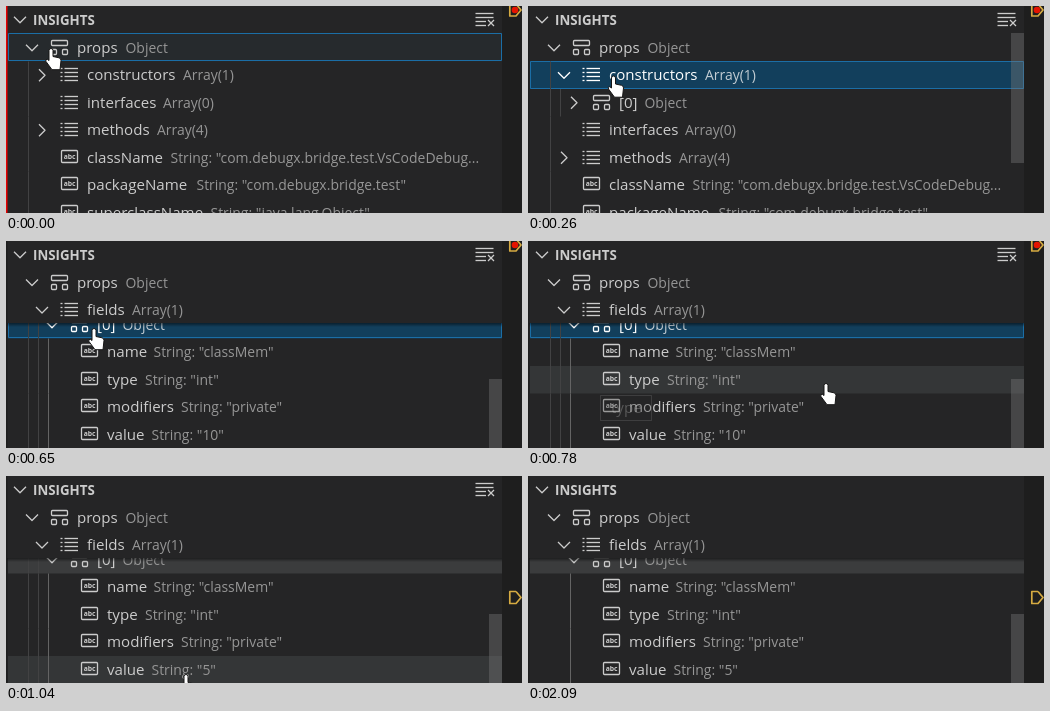
Animation of 516x207 px, one loop 2.22 s. Source, as an HTML page with a canvas:

```html
<!DOCTYPE html>
<html lang="en">
<head>
<meta charset="utf-8">
<title>Insights panel</title>
<style>
  html, body { margin: 0; width: 516px; height: 207px; overflow: hidden; background: #252526; }
  canvas { display: block; }
</style>
</head>
<body>
<canvas id="stage" width="516" height="207"></canvas>
<script>
const ctx = document.getElementById('stage').getContext('2d');
const LOOP = 2220, ROW = 27.5, TOP = 28, PANEL = 496;
const FG = '#cccccc', DIM = '#969696', BRIGHT = '#ffffff', BRIGHT_DIM = '#c3cdd4';

const node = (level, icon, label, type, typeX, open) => ({ level, icon, label, type, typeX, open });
const opened = n => ({ ...n, open: true });

const props = node(0, 'object', 'props', 'Object', 119.5, true);
const constructors = node(1, 'array', 'constructors', 'Array(1)', 177, false);
const interfaces = node(1, 'array', 'interfaces', 'Array(0)', 157);
const methods = node(1, 'array', 'methods', 'Array(4)', 151, false);
const className = node(1, 'string', 'className', 'String: "com.debugx.bridge.test.VsCodeDebug...', 164.5);
const packageName = node(1, 'string', 'packageName', 'String: "com.debugx.bridge.test"', 190.5);
const superName = node(1, 'string', 'superclassName', 'String: "java.lang.Object"', 204.5);
const fields = node(1, 'array', 'fields', 'Array(1)', 126, true);
const item = node(2, 'object', '[0]', 'Object', 116.5, false);
const itemName = node(3, 'string', 'name', 'String: "com.debugx.bridge.test.VsCodeDebugXBr...', 147.5);
const modifiers = type => node(3, 'string', 'modifiers', `String: "${type}"`, 175);
const parameters = node(3, 'array', 'parameters', 'Array(1)', 189, false);

const member = value => [
  opened(item),
  node(3, 'string', 'name', 'String: "classMem"', 147.5),
  node(3, 'string', 'type', 'String: "int"', 139),
  modifiers('private'),
  node(3, 'string', 'value', `String: "${value}"`, 145.5)
];
const leaves = [interfaces, methods, className, packageName, superName];
const scrolled = (value, more) => ({
  sticky: [props, fields], rows: member(value), top: 70,
  selected: 0, style: 'active', bar: [138, 69], guides: 1, actions: true, ...more
});
const tree = (rows, more) => ({
  sticky: [], rows, top: TOP, style: 'active', guides: 1, actions: true, paused: true, ...more
});

const scenes = [
  tree([props, constructors, ...leaves],
    { at: 0, selected: 0, style: 'outline', cursor: [45, 43], edge: true }),
  tree([props, constructors, ...leaves],
    { at: 130, selected: 0, style: 'outline', hover: 1, cursor: [78, 67] }),
  tree([props, opened(constructors), item, ...leaves],
    { at: 260, selected: 1, bar: [27, 130], cursor: [85.5, 70.5] }),
  tree([props, opened(constructors), opened(item), itemName, modifiers(''), parameters, interfaces],
    { at: 390, selected: 2, bar: [27, 98], cursor: [74.5, 107] }),
  tree([...leaves, fields],
    { at: 520, sticky: [props], top: 55, selected: 5, bar: [95, 98], cursor: [88, 187] }),
  scrolled('10', { at: 650, paused: true, cursor: [88, 88] }),
  scrolled('10', { at: 780, paused: true, hover: 2, cursor: [298, 143], tooltip: true }),
  scrolled('10', { at: 910, paused: true, hover: 4, cursor: [205, 186] }),
  scrolled('5', { at: 1040, style: 'inactive', hover: 4, cursor: [180, 199] }),
  scrolled('5', { at: 1960, style: 'inactive', guides: 0.3, actions: false }),
  scrolled('5', { at: 2090, style: 'inactive', guides: 0, actions: false })
];

const hand = new Path2D('M-2 1.5a2 2 0 0 1 4 0v6l6 1.3q2 .6 2 2.6l-1 9.3h-8l-6-8.2q-1-2 1.2-2.3l1.8 1.3z');

function fill(color, x, y, w, h) {
  ctx.fillStyle = color;
  ctx.fillRect(x, y, w, h);
}

function line(points, color = FG, width = 1.3) {
  ctx.strokeStyle = color;
  ctx.lineWidth = width;
  ctx.beginPath();
  points.forEach(([x, y]) => ctx.lineTo(x, y));
  ctx.stroke();
}

function text(str, x, y, size, color, weight = 400) {
  ctx.font = `${weight} ${size}px "Open Sans", sans-serif`;
  ctx.fillStyle = color;
  ctx.fillText(str, x, Math.round(y));
}

function chevron(x, y, open, color) {
  line(open ? [[x - 6, y - 3], [x, y + 3], [x + 6, y - 3]]
            : [[x - 3, y - 6], [x + 3, y], [x - 3, y + 6]], color);
}

function box(x, y, w, h, color) {
  ctx.strokeStyle = color;
  ctx.lineWidth = 1.3;
  ctx.beginPath();
  ctx.roundRect(x, y, w, h, 1);
  ctx.stroke();
}

const icons = {
  object(x, y, color) {
    box(x - 8, y - 8, 16, 5, color);
    box(x - 8, y + 1, 5, 5, color);
    box(x + 3, y + 1, 5, 5, color);
  },
  array(x, y, color) {
    for (let dy = -7; dy <= 5; dy += 4) {
      line([[x - 9, y + dy], [x - 7, y + dy]], color);
      line([[x - 5, y + dy], [x + 8.5, y + dy]], color);
    }
  },
  string(x, y, color) {
    box(x - 8, y - 8, 16, 12, color);
    text('abc', x - 5.8, y + 0.5, 6.8, color, 700);
  }
};

function drawRow(n, y, bright) {
  const x = n.level * 10, color = bright ? BRIGHT : FG;
  if (n.open !== undefined) chevron(x + 26, y, n.open, color);
  icons[n.icon](x + 53.5, Math.round(y) + 0.5, color);
  text(n.label, x + 71, y + 5, 15.1, color);
  text(n.type, n.typeX, y + 5, 13.95, bright ? BRIGHT_DIM : DIM);
}

function drawSelection(y, style) {
  if (style === 'inactive') return fill('#3b3c3d', 2, y, PANEL - 2, ROW);
  fill(style === 'active' ? '#123f5c' : '#262a2d', 2, y, PANEL - 2, ROW);
  ctx.strokeStyle = '#1b6ea6';
  ctx.lineWidth = 1;
  ctx.strokeRect(2.5, Math.round(y) - 0.5, PANEL - 3, 27);
}

function drawRows(scene) {
  const { rows, sticky, top } = scene;
  const limit = 27 + sticky.length * ROW;
  const deepest = Math.max(...rows.map(n => n.level));
  ctx.save();
  ctx.beginPath();
  ctx.rect(0, limit, PANEL, 207);
  ctx.clip();
  rows.forEach((n, i) => {
    const y = top + i * ROW;
    if (i === scene.hover) fill('#343637', 2, y, PANEL - 2, ROW);
    if (i === scene.selected) drawSelection(y, scene.style);
    for (let level = 0; level < n.level; level++) {
      const active = level === 2 && deepest === 3;
      ctx.globalAlpha = active ? 1 : scene.guides;
      fill(active ? '#646464' : '#424243', 22 + level * 10, y, 1, ROW);
    }
    ctx.globalAlpha = 1;
    drawRow(n, y + ROW / 2, i === scene.selected && scene.style === 'active');
  });
  if (sticky.length) {
    const shade = ctx.createLinearGradient(0, limit, 0, limit + 4);
    shade.addColorStop(0, 'rgba(0,0,0,.5)');
    shade.addColorStop(1, 'rgba(0,0,0,0)');
    fill(shade, 0, limit, PANEL, 4);
  }
  ctx.restore();
  sticky.forEach((n, i) => drawRow(n, TOP + (i + 0.5) * ROW - 0.25));
}

function drawHeader(actions) {
  chevron(14, 13.7, true);
  text('INSIGHTS', 27, 19, 13.3, FG, 700);
  if (!actions) return;
  [7.5, 11.5, 15.5, 19.5].forEach((y, i) => line([[469.5, y], [i < 2 ? 487.5 : 480, y]]));
  line([[482, 14], [488, 20]]);
  line([[488, 14], [482, 20]]);
}

function drawMarker(y, breakpoint) {
  if (breakpoint) {
    ctx.fillStyle = '#e51400';
    ctx.beginPath();
    ctx.arc(509, y, 3.3, 0, 7);
    ctx.fill();
  }
  line([[510, y - 6], [503.8, y - 6], [503.8, y + 6], [510, y + 6], [515, y], [510, y - 6]], '#d6ab42', 1.7);
}

function drawTooltip() {
  ctx.globalAlpha = 0.3;
  fill('#252526', 72, 154, 52, 26);
  ctx.strokeStyle = '#777';
  ctx.lineWidth = 1;
  ctx.strokeRect(72.5, 154.5, 51, 25);
  text('type', 83, 172, 15.1, FG);
  ctx.globalAlpha = 1;
}

function drawCursor([x, y]) {
  ctx.save();
  ctx.translate(x, y);
  ctx.fillStyle = '#fff';
  ctx.fill(hand);
  ctx.strokeStyle = '#161616';
  ctx.lineWidth = 1;
  ctx.stroke(hand);
  ctx.restore();
}

function draw(scene) {
  ctx.lineJoin = 'round';
  fill('#252526', 0, 0, 516, 207);
  drawRows(scene);
  drawHeader(scene.actions);
  if (scene.bar) fill('rgba(121,121,121,.4)', 483, scene.bar[0], 13, scene.bar[1]);
  fill('#1e1e1e', PANEL, 0, 20, 207);
  fill(scene.edge ? '#e60000' : '#1e1e1e', 0, 0, 1.5, 207);
  drawMarker(scene.paused ? 4 : 121.5, scene.paused);
  if (scene.tooltip) drawTooltip();
  if (scene.cursor) drawCursor(scene.cursor);
}

const start = performance.now();
function tick() {
  const t = (performance.now() - start) % LOOP;
  draw(scenes.findLast(s => s.at <= t));
  requestAnimationFrame(tick);
}
tick();
</script>
</body>
</html>
```
